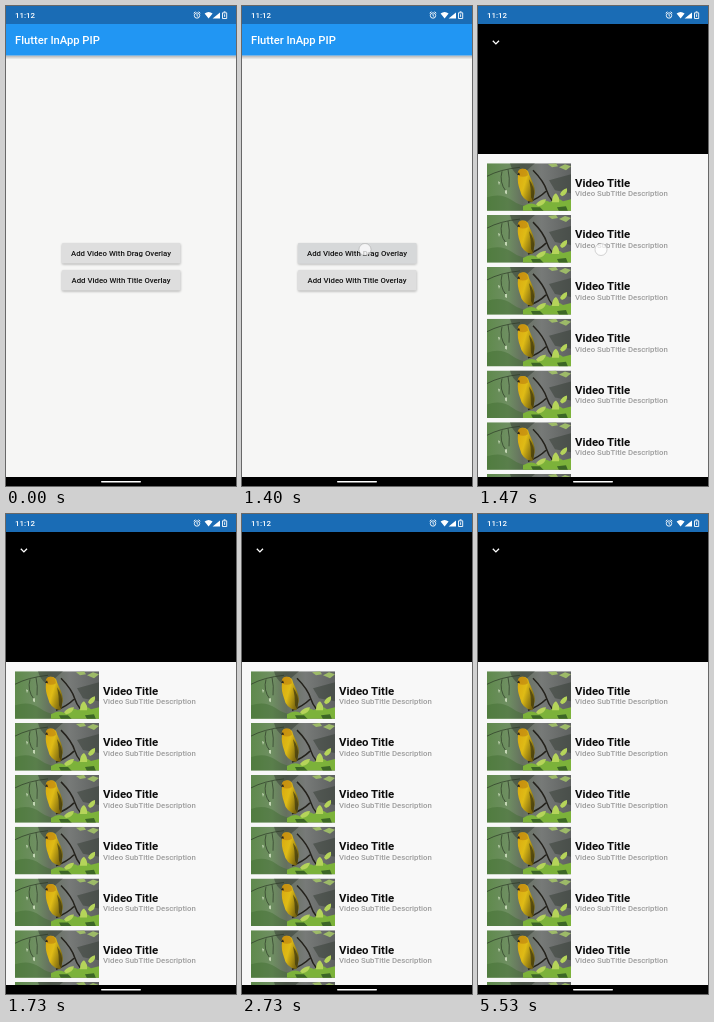
These frames come from a looping animation (230x480 px, 8 s). An HTML page:

```html
<!DOCTYPE html>
<html lang="en">
<head>
<meta charset="utf-8">
<title>Flutter InApp PIP</title>
<style>
html, body { margin: 0; width: 100%; height: 100%; overflow: hidden; background: #f6f6f5; }
svg { display: block; width: 230px; height: 480px; font-family: Roboto, sans-serif; }
.bar { font-size: 11.2px; font-weight: 500; fill: #fff; }
.label { font-size: 7.8px; font-weight: 500; fill: #111; text-anchor: middle; }
.title { font-size: 11.4px; font-weight: 700; fill: #0c0c0c; }
.sub { font-size: 7.8px; font-weight: 500; fill: #9c9c9c; }
.clock { font-size: 7.9px; font-weight: 500; fill: #fff; }
.button { fill: #dedede; filter: drop-shadow(0 1px .8px rgba(0,0,0,.28)); }
.line { fill: none; stroke: #fff; }

/* 8 s loop: tap at 1330 ms, page opens at 1470 ms, tap gone at 1730 ms */
.page { animation: open 8s step-end infinite; }
.press { animation: press 8s step-end infinite; }
.tap { animation: tap 8s linear infinite; }
@keyframes open { 0% { visibility: hidden; } 18.37%, 100% { visibility: visible; } }
@keyframes press { 0% { opacity: 0; } 16.62% { opacity: .5; } 17.49%, 100% { opacity: 1; } }
@keyframes tap {
  0%, 16.61% { opacity: 0; }
  16.62% { opacity: .7; }
  17.5%, 18.5% { opacity: 1; }
  21.62%, 100% { opacity: 0; }
}
</style>
</head>
<body>
<svg viewBox="0 0 230 480">
  <defs>
    <linearGradient id="blur">
      <stop offset="0" stop-color="#5f8a4c"/>
      <stop offset=".25" stop-color="#6f8f62"/>
      <stop offset=".42" stop-color="#65705f"/>
      <stop offset=".65" stop-color="#777a78"/>
      <stop offset="1" stop-color="#5f6261"/>
    </linearGradient>
    <linearGradient id="shade" x2="0" y2="1">
      <stop offset="0" stop-color="#000" stop-opacity=".28"/>
      <stop offset="1" stop-color="#000" stop-opacity="0"/>
    </linearGradient>
    <linearGradient id="plume" x2="1" y2=".6">
      <stop offset="0" stop-color="#d9a80f"/>
      <stop offset=".5" stop-color="#dfbb16"/>
      <stop offset="1" stop-color="#78650f"/>
    </linearGradient>
    <clipPath id="crop"><path d="M0 0h84v47.500H0z"/></clipPath>

    <g id="row">
      <g clip-path="url(#crop)">
        <path fill="url(#blur)" d="M0 0h84v48H0z"/>
        <path fill="#3f6a30" opacity=".45" d="M0 34Q14 29 25 37T46 42V48H0z"/>
        <path fill="#343c35" opacity=".5" d="M23 0H48L40 7 31 12Q25 8 23 0zM62 17L84 11V30L68 27z"/>
        <g fill="none" stroke="#2d3a28" stroke-width=".7">
          <path d="M0 13Q13 6 33 4M15 8Q12 19 19 28M21 6Q23 15 22 24"/>
          <path stroke="#24221c" stroke-width="1.500" d="M46 7Q57 18 60 28T75 46M59 28Q52 35 41 39"/>
        </g>
        <path fill="#c3d6b4" d="M18 27l2 0 0 4-2-1zM11 18l2 1-1 3z"/>
        <path fill="#9dba68" d="M61 1l8-1 2 3-6 1zM72 4l6-3 6 2-5 4z"/>
        <path fill="#7cb23a" d="M36 43q8-5 14-1 6-7 13-3 7-6 13-1l8-2V48H36z"/>
        <path fill="#b5d45a" d="M49 41q4-5 10-5-1 6-8 7zM65 39q0-7 4-9 4 4 3 9zM73 31q2-5 7-6 1 6-5 8z"/>
        <path fill="#3c6626" d="M44 44l9 0 4 4H46zM70 44l9-1 2 5h-9z"/>
        <path fill="url(#plume)" d="M31 12Q30 6 35 5.500 41 5 42 11L46 20Q49 28 47 33 47 37 45 39 35 37 33 27 30 19 31 12z"/>
        <path fill="#3f390f" opacity=".7" d="M42 16Q48 24 47 33L46 38 44 34Q44 24 42 16z"/>
        <path fill="#b8780e" opacity=".5" d="M31 12Q30 6 35 5.500 41 5 41 12 36 15 31 12z"/>
        <path fill="#2b261a" d="M32 9l-2 2.500 3 .5z"/>
      </g>
      <text class="title" x="88" y="23.300">Video Title</text>
      <text class="sub" x="88" y="32.900">Video SubTitle Description</text>
    </g>
  </defs>

  <path fill="#f6f6f5" d="M0 0h230v480H0z"/>
  <path fill="url(#shade)" d="M0 49.500h230v4H0z"/>
  <path fill="#2196f3" d="M0 18h230v31.500H0z"/>
  <text class="bar" x="9" y="38.200">Flutter InApp PIP</text>
  <rect class="button" x="56" y="237" width="118.500" height="20.500" rx="1.200"/>
  <rect class="button" x="56" y="264" width="118.500" height="20.500" rx="1.200"/>
  <rect class="press" fill="#d6d8d9" x="56" y="237" width="118.500" height="20.500" rx="1.200"/>
  <text class="label" x="115" y="249.800">Add Video With Drag Overlay</text>
  <text class="label" x="115" y="276.800">Add Video With Title Overlay</text>

  <g class="page">
    <path fill="#f8f8f8" d="M0 148h230v332H0z"/>
    <path d="M0 18h230v130H0z"/>
    <path class="line" stroke-width="1.300" d="M14.800 34.800l3.100 3.100 3.100-3.100"/>
    <use href="#row" x="9" y="157.300"/>
    <use href="#row" x="9" y="209.100"/>
    <use href="#row" x="9" y="260.900"/>
    <use href="#row" x="9" y="312.700"/>
    <use href="#row" x="9" y="364.500"/>
    <use href="#row" x="9" y="416.300"/>
    <use href="#row" x="9" y="468.100"/>
  </g>

  <circle class="tap" cx="123" cy="243.500" r="6" fill="#fff" fill-opacity=".72" stroke="#777" stroke-opacity=".38" stroke-width=".8"/>

  <path fill="#1a6cb5" d="M0 0h230v18H0z"/>
  <text class="clock" x="9" y="12">11:12</text>
  <g class="line" stroke-width=".9">
    <circle cx="191" cy="9.500" r="2.700"/>
    <path d="M191 8v1.700l1.200.7M187.700 7.200l1.700-1.500M194.300 7.200l-1.700-1.500"/>
    <path d="M216.500 6.800h4.200v5.700h-4.200zM217.700 5.800h1.800M218.600 8.300v2.600"/>
  </g>
  <path fill="#fff" d="M198.600 7.500Q202.600 4.500 206.600 7.500L202.600 12.400zM206.600 12.400L214 6.500V12.400z"/>

  <path d="M0 471h230v9H0z"/>
  <rect fill="#fff" x="95" y="475" width="40" height="1.500" rx=".7"/>
</svg>
</body>
</html>
```
